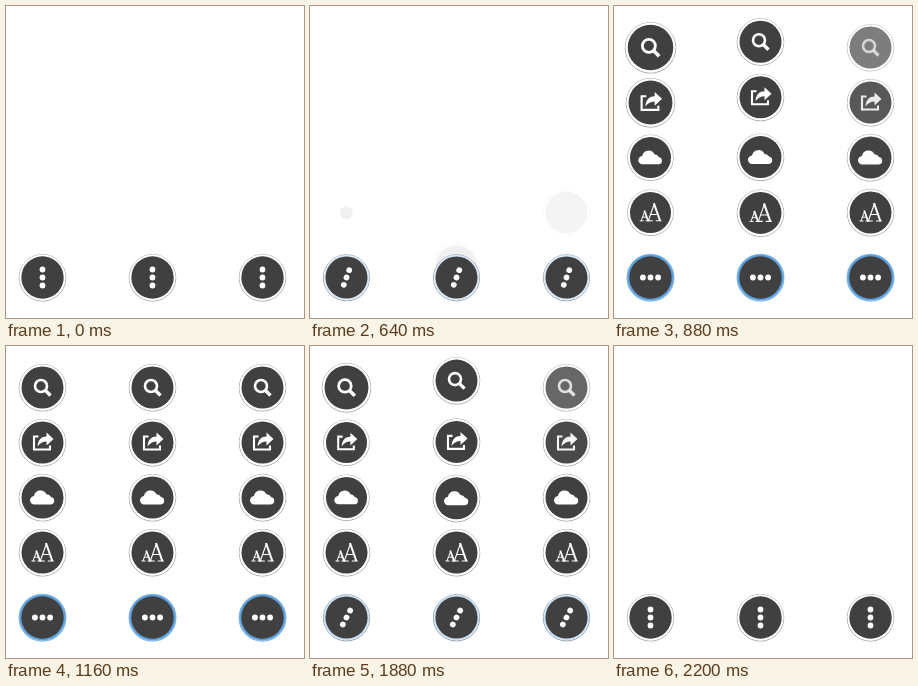
Animation, 298 px wide and 312 px high, one loop 2880 ms. Source, as an HTML page with a canvas:

```html
<!DOCTYPE html>
<html lang="en">
<head>
<meta charset="utf-8">
<title>Expanding menus</title>
<style>
  html, body { margin: 0; width: 100%; height: 100%; overflow: hidden; background: #fff; }
  canvas { display: block; }
</style>
</head>
<body>
<canvas id="stage" width="298" height="312"></canvas>
<script>
const ctx = document.getElementById('stage').getContext('2d');
const LOOP = 2880, STEP = 40, STAGGER = 40;
const PRESS_OPEN = 400, OPEN = 560, PRESS_CLOSE = 1680, CLOSE = 1720, SPAN = 520;
const DARK = '#404040', MAIN_Y = 271.5;
const ITEM_Y = [206.5, 151.5, 96.5, 41.5];

// Piecewise linear curves: [time, value]
const POP = [[0, 0], [40, .3], [80, .52], [120, .8], [160, 1.085], [172, 1.1], [200, 1.045], [250, .96], [320, 1]];
const SLIDE = [[0, 0], [40, .17], [80, .36], [120, .66], [160, 1.025], [200, 1.03], [260, .99], [320, 1]];
const APPEAR = [[0, 0], [40, .08], [80, .31], [120, .62], [160, 1]];
const RELEASE_OPEN = [[0, .93], [80, .99], [160, 1.03], [240, 1]];
const RELEASE_CLOSE = [[0, .92], [120, .98], [280, 1.035], [440, 1]];

const clamp = v => Math.max(0, Math.min(1, v));
const smooth = v => (1 - Math.cos(Math.PI * clamp(v))) / 2;
const mix = (a, b, k) => a + (b - a) * k;

function curve(points, t) {
  const i = points.findIndex(p => p[0] > t);
  if (i < 0) return points[points.length - 1][1];
  if (i === 0) return points[0][1];
  const [t0, v0] = points[i - 1], [t1, v1] = points[i];
  return mix(v0, v1, (t - t0) / (t1 - t0));
}

function disc(x, y, r, color) {
  ctx.fillStyle = color;
  ctx.beginPath();
  ctx.arc(x, y, r, 0, 2 * Math.PI);
  ctx.fill();
}

function ring(x, y, r, width, color) {
  ctx.strokeStyle = color;
  ctx.lineWidth = width;
  ctx.beginPath();
  ctx.arc(x, y, r, 0, 2 * Math.PI);
  ctx.stroke();
}

function line(width, path) {
  ctx.strokeStyle = '#fff';
  ctx.lineWidth = width;
  ctx.stroke(new Path2D(path));
}

function letterA(x, width, height, base, weight) {
  const w = width / 2, top = base - height;
  line(weight * .7, `M${x - w + 1.5} ${base}L${x} ${top + 1}M${x - w * .55} ${base - height * .36}H${x + w * .5}
    M${x - w} ${base}h${w * .8}M${x + w} ${base}h${-w * .8}`);
  line(weight * 1.3, `M${x - .3} ${top}L${x + w - 1.5} ${base}`);
}

const arrow = new Path2D('M-5 4C-4.5-3-1-6 4-6V-10L11-3.5 4 3V-1C0-1-3 1-5 4Z');
const cloud = new Path2D('M-8 7A4.2 4.2 0 0 1-8.5-1.5A6.6 6.6 0 0 1 4-3.2A5 5 0 0 1 8.5-.5A3.8 3.8 0 0 1 8.5 7Z');

const ICONS = [
  () => {
    letterA(-6, 10, 10.5, 8.5, 1.4);
    letterA(3.8, 15, 18, 8.5, 1.6);
  },
  () => { ctx.fillStyle = '#fff'; ctx.fill(cloud); },
  () => {
    line(2.1, 'M-4-6H-8.5V7H7.5V3');
    ctx.fillStyle = '#fff';
    ctx.fill(arrow);
  },
  () => {
    ring(-1.5, -1.5, 6, 2.6, '#fff');
    line(3.4, 'M3 3L8 8');
  }
];

function drawItem(i, x, y, scale, alpha) {
  if (alpha <= 0 || scale <= 0) return;
  ctx.save();
  ctx.translate(x, y);
  ctx.scale(scale, scale);
  ctx.globalAlpha = alpha;
  ring(0, .3, 23.3, .8, '#999');
  disc(0, 0, 23, '#fff');
  disc(0, 0, 21, DARK);
  ICONS[i]();
  ctx.restore();
}

function drawMain(x, scale, turn) {
  const tint = (r, g, b, from) => `rgb(${mix(from, r, turn)},${mix(from, g, turn)},${mix(from, b, turn)})`;
  ctx.save();
  ctx.translate(x, MAIN_Y);
  ctx.scale(scale, scale);
  ring(0, .3, 23.3, mix(.8, 1.4, turn), tint(135, 185, 230, 153));
  disc(0, 0, 23, tint(91, 158, 218, 255));
  disc(0, 0, 21.2, DARK);
  ctx.rotate(turn * Math.PI / 2);
  for (const dy of [-1, 0, 1]) disc(0, dy * mix(8, 7.6, turn), 2.9, '#fff');
  ctx.restore();
}

function menuState(t) {
  if (t < PRESS_OPEN) return { p: 0, fade: 0, turn: 0, scale: 1 };
  if (t < OPEN) return { p: 0, fade: 0, turn: 0, scale: .9 };
  if (t < PRESS_CLOSE) {
    const p = t - OPEN;
    return { p, fade: p, turn: easeTurn(p), scale: curve(RELEASE_OPEN, p) };
  }
  if (t < CLOSE) return { p: SPAN, fade: SPAN, turn: 1, scale: .9 };
  const c = t - CLOSE;
  return { p: SPAN - c, fade: SPAN - 18 - c, turn: 1 - easeTurn(c), scale: curve(RELEASE_CLOSE, c) };
}

function easeTurn(t) {
  const u = clamp(t / 240);
  return u * u * (3 - 2 * u) * mix(.8, 1, u);
}

function draw(now) {
  const t = Math.floor((now % LOOP) / STEP) * STEP;
  const { p, fade, turn, scale } = menuState(t);
  ctx.fillStyle = '#fff';
  ctx.fillRect(0, 0, 298, 312);

  for (let i = 3; i >= 0; i--) {
    const delay = STAGGER * (i + 1), local = p - delay, y = ITEM_Y[i];
    const alpha = curve(APPEAR, local);
    drawItem(i, 36.5, y, curve(POP, local), alpha);
    drawItem(i, 146.5, mix(MAIN_Y, y, curve(SLIDE, local)), 1, alpha);
    drawItem(i, 256.5, y, 1, smooth((fade - delay) / 260));
  }
  for (const x of [36.5, 146.5, 256.5]) drawMain(x, scale, turn);
}

let start;
function tick(now) {
  start ??= now;
  draw(now - start);
  requestAnimationFrame(tick);
}
requestAnimationFrame(tick);
</script>
</body>
</html>
```
